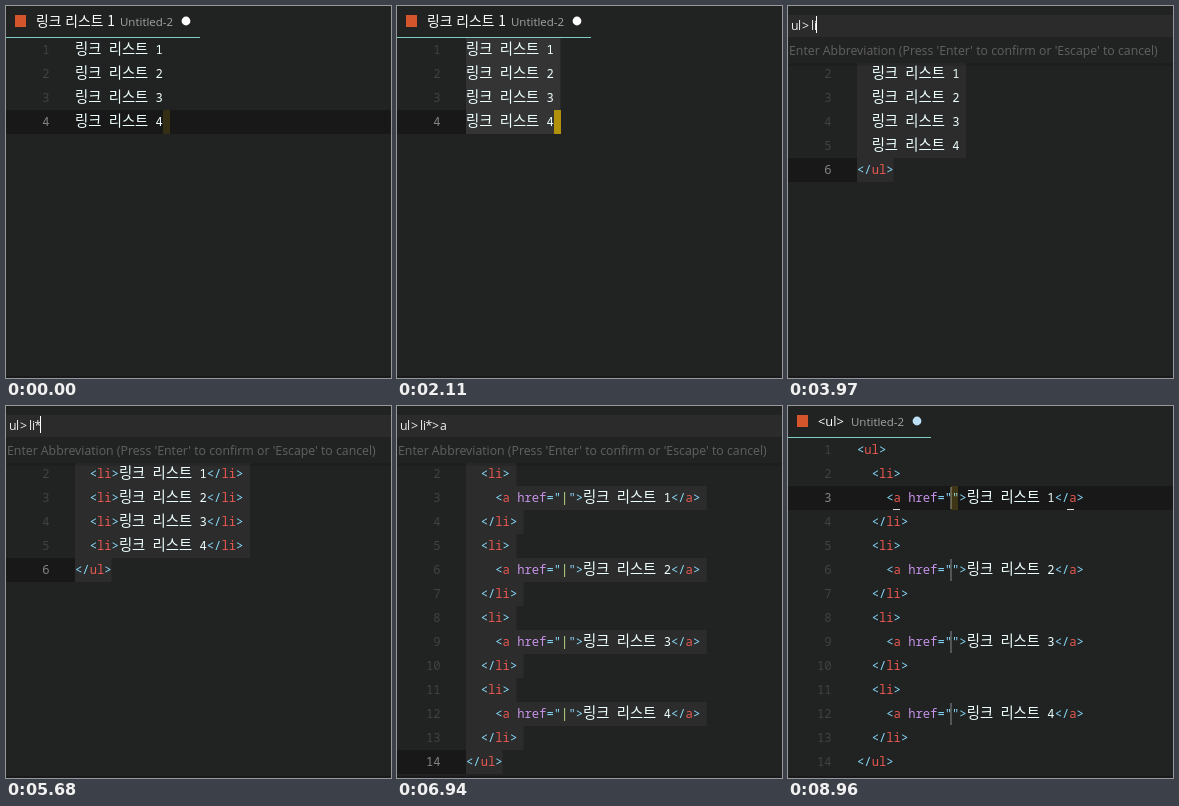
These frames come from a looping animation (385 px wide and 372 px high, 9.29 s). An HTML page:

```html
<!DOCTYPE html>
<html lang="ko">
<head>
<meta charset="utf-8">
<title>Wrap with abbreviation</title>
<style>
html, body { margin: 0; width: 100%; height: 100%; overflow: hidden; background: #212222; }
svg { display: block; }
text { white-space: pre; font-family: "Open Sans", "Noto Sans", sans-serif; }
.code, .num { font: 500 12.2px "Noto Sans Mono", "DejaVu Sans Mono", monospace; fill: #eff; }
.num { font-weight: 400; text-anchor: end; fill: #424242; }
.num.active { fill: #848484; }
.ko { font-family: "Noto Sans CJK KR", "Noto Sans CJK JP", "Noto Sans CJK", sans-serif; }
.code .ko { font-size: 14.35px; font-weight: 400; }
.punct { fill: #89ddff; }
.tag { fill: #e8584f; }
.attr { fill: #c792ea; }
.str { fill: #c3e88d; }
</style>
</head>
<body>
<svg id="stage" width="385" height="372" viewBox="0 0 385 372"></svg>
<script>
const LOOP = 9290, BG = '#212222', LEFT = 69, CH = 7.32, HANGUL = 13.2, ROW = 24;
const TYPED = 'ul>li*>a';
const glyphX = [3, 10, 14, 23, 26, 28.5, 35, 43];
const caretX = [3, 10, 13, 22, 25, 28, 34, 42, 49];

const items = [1, 2, 3, 4].map(i => '링크 리스트 ' + i);
const wrap = (tag, lines) => [`<${tag}>`, ...lines.map(l => '  ' + l), `</${tag}>`];
const links = bar => wrap('ul', items.flatMap(s => wrap('li', [`<a href="${bar}">${s}</a>`])));
const docs = {
  plain: items,
  u: wrap('u', items),
  ul: wrap('ul', items),
  single: wrap('ul', wrap('li', items)),
  list: wrap('ul', items.map(s => `<li>${s}</li>`)),
  preview: links('|'),
  done: links('')
};

// Each step overrides part of the state from its time on.
const steps = [
  [0, { doc: 'plain', active: 4, cursor: .12, sel: '', typed: -1, caret: 1, keys: 0 }],
  [70, { cursor: .04 }], [140, { cursor: 0 }],
  [410, { cursor: .35 }], [480, { cursor: .8 }], [550, { cursor: 1 }],
  [1020, { cursor: .65 }], [1090, { cursor: .25 }], [1160, { cursor: 0 }],
  [1430, { cursor: .5, sel: '#343434' }], [1500, { cursor: 1 }],
  [2110, { cursor: .65 }],
  [2180, { cursor: 0, typed: 0, keys: 1, sel: '#2c2c2c' }],
  [2710, { caret: 0 }],
  [2780, { typed: 1, caret: 1 }],
  [2850, { doc: 'u', active: 6 }],
  [2910, { typed: 2 }],
  [3040, { doc: 'ul' }],
  [3310, { keys: 0 }], [3440, { caret: 0 }],
  [3640, { typed: 3, caret: 1 }],
  [3900, { typed: 4 }], [3970, { typed: 5 }],
  [4100, { doc: 'single', active: 8 }],
  [4560, { caret: 0 }],
  [4620, { typed: 6, caret: 1 }],
  [4750, { doc: 'list', active: 6 }],
  [5150, { caret: 0 }], [5680, { caret: 1 }],
  [5950, { typed: 7 }],
  [6010, { doc: 'plain', active: 4 }],
  [6080, { doc: 'list', active: 6 }],
  [6410, { typed: 8 }],
  [6540, { doc: 'plain', active: 4 }],
  [6610, { doc: 'preview', active: 14 }],
  [6940, { caret: 0 }], [7470, { caret: 1 }], [8000, { caret: 0 }],
  [8200, { typed: -1 }],
  [8270, { doc: 'done', active: 3, sel: '', cursor: 1 }],
  [8820, { cursor: .65 }], [8890, { cursor: .4 }], [8960, { cursor: .16 }]
];

const esc = s => s.replace(/</g, '&lt;').replace(/>/g, '&gt;');
const rect = (x, y, w, h, fill, more = '') =>
  `<rect x="${x}" y="${y}" width="${w}" height="${h}" fill="${fill}" ${more}/>`;
const label = (x, y, size, fill, s, more = '') =>
  `<text x="${x}" y="${y}" font-size="${size}" fill="${fill}" ${more}>${esc(s)}</text>`;
const rowY = n => 32 + ROW * (n - 1);
const textWidth = s => [...s].reduce((w, c) => w + (c >= '가' ? HANGUL : CH), 0);

function kind(s) {
  if (s === 'href') return 'attr';
  if (s === '|') return 'str';
  return /[가-힣]/.test(s) ? 'ko' : /[a-z]/.test(s) ? 'tag' : /[<>="]/.test(s) ? 'punct' : '';
}

const paint = line => line.match(/[가-힣]+|[a-z]+|[<>\/="]+|\||[\d ]+/g)
  .map(s => `<tspan class="${kind(s)}">${esc(s)}</tspan>`).join('');

function editor(s) {
  const lines = docs[s.doc], done = s.doc === 'done';
  let out = rect(0, rowY(s.active), s.sel ? LEFT : 385, ROW, '#181818');
  lines.forEach((line, i) => {
    const n = i + 1, y = rowY(n);
    const newline = n < lines.length ? 6.5 : 0;
    if (s.sel) out += rect(LEFT, y, textWidth(line) + newline, ROW, s.sel);
    if (done && line.includes('href')) out += rect(162, y + 1, 2, 22, '#555');
    out += `<text class="num ${n === s.active ? 'active' : ''}" x="43.5" y="${y + 16}">${n}</text>`;
    out += `<text class="code" x="${LEFT}" y="${y + 16}">${paint(line)}</text>`;
  });
  if (done) out += rect(105, 103, 7, 1, '#ddd') + rect(279, 103, 7, 1, '#ddd');
  if (s.cursor) out += rect(done ? 163 : 157, rowY(s.active), 7, ROW, '#fc0', `opacity="${s.cursor}"`);
  return out;
}

function tab(s) {
  const plain = s.doc === 'plain';
  const title = plain ? label(30, 20, 13.8, '#fff', items[0], 'class="ko"') : label(30, 20, 12.8, '#fff', '<ul>');
  const [nameX, dotX, end] = plain ? [114, 180, 194] : [63, 129, 171].map((x, i) => i === 2 ? 143 + 28 : x);
  return rect(9, 9, 11, 12, '#d4552b') + title +
    label(nameX, 20, 11.5, '#a3a3a3', 'Untitled-2') +
    `<circle cx="${dotX}" cy="15" r="4.4" fill="${plain ? '#fff' : '#bde0f7'}"/>` +
    rect(0, 31, plain ? end : 143, 1, '#80cbc4');
}

function prompt(s) {
  return rect(0, 57, 385, 3, '#000', 'opacity=".12"') +
    rect(0, 0, 385, 57, BG) + rect(0, 9, 385, 22, '#2b2b2b') +
    label(glyphX.slice(0, s.typed || 1).join(' '), 24, 12.3, '#eee', TYPED.slice(0, s.typed)) +
    (s.caret ? rect(caretX[s.typed], 10, 1, 17, '#fff') : '') +
    label(1, 49, 12.3, '#616161', "Enter Abbreviation (Press 'Enter' to confirm or 'Escape' to cancel)");
}

const shortcut = () => rect(77, 328, 233, 44, '#000') +
  label(85, 361, 30.2, '#fff', 'Ctrl + Shift + A', 'font-weight="700"');

const stage = document.getElementById('stage');
let shown = 0;

function draw(now) {
  const t = now % LOOP;
  const count = steps.filter(([at]) => at <= t).length;
  if (count !== shown) {
    shown = count;
    const s = Object.assign({}, ...steps.slice(0, count).map(step => step[1]));
    stage.innerHTML = rect(0, 0, 385, 372, BG) + editor(s) + rect(0, 370, 385, 2, '#1a191c') +
      (s.typed < 0 ? tab(s) : prompt(s)) + (s.keys ? shortcut() : '');
  }
  requestAnimationFrame(draw);
}
draw(0);
</script>
</body>
</html>
```
